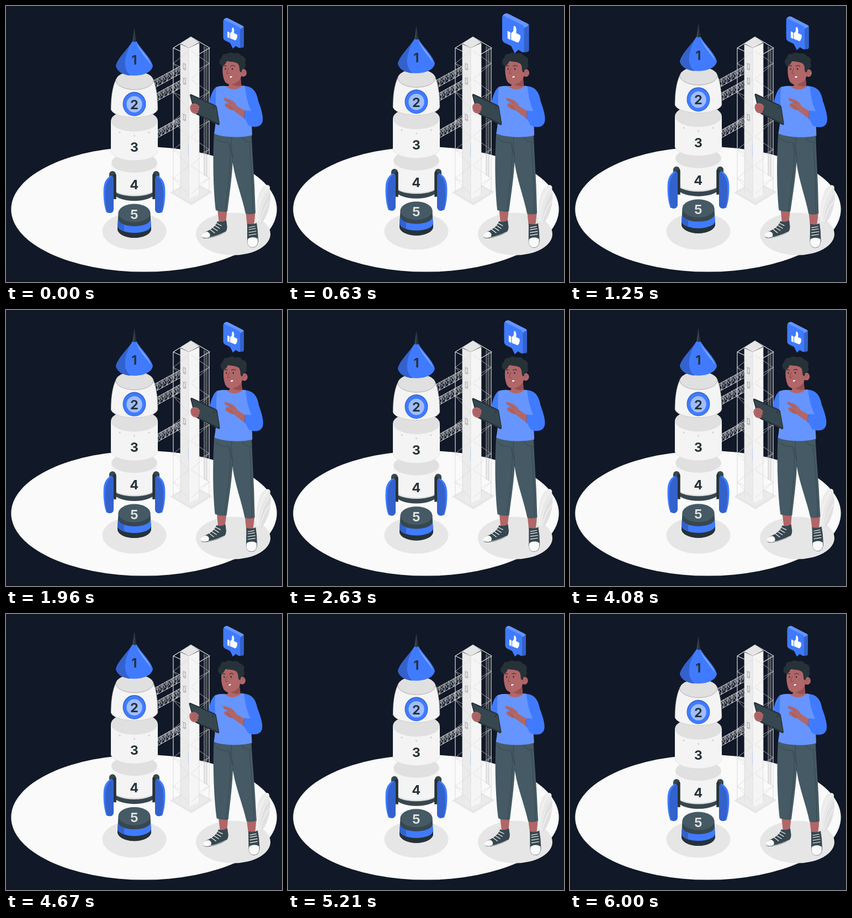
An HTML page with a canvas for the animation above (6.04 s loop, 500 by 500 pixels).

```html
<!DOCTYPE html>
<html lang="en">
<head>
<meta charset="utf-8">
<title>Rocket assembly</title>
<style>
html, body { margin: 0; width: 100%; height: 100%; overflow: hidden; background: #111827; }
canvas { display: block; width: 500px; height: 500px; }
</style>
</head>
<body>
<canvas id="stage"></canvas>
<script>
const canvas = document.getElementById('stage');
const ctx = canvas.getContext('2d');
const ratio = window.devicePixelRatio || 1;
canvas.width = canvas.height = 500 * ratio;

const LOOP = 6040, CYCLE = 6000;
const BLUE = '#407bff', SKY = '#6695ff', NAVY = '#3362cc';
const INK = '#263238', SLATE = '#37474f', STEEL = '#455a64';
const SKIN = '#b16668', SHADE = '#9a5052';
const WHITE = '#fafafa', HULL = '#f4f4f4', GREY = '#e0e0e0', PALE = '#ebebeb';

const paths = new Map();
function path(d) {
  if (!paths.has(d)) paths.set(d, new Path2D(d));
  return paths.get(d);
}
function fill(color, d) {
  ctx.fillStyle = color;
  ctx.fill(path(d));
}
function line(color, width, d) {
  ctx.strokeStyle = color;
  ctx.lineWidth = width;
  ctx.stroke(path(d));
}
function oval(color, x, y, rx, ry = rx) {
  ctx.fillStyle = color;
  ctx.beginPath();
  ctx.ellipse(x, y, rx, ry, 0, 0, Math.PI * 2);
  ctx.fill();
}
function group(draw, setup) {
  ctx.save();
  setup();
  draw();
  ctx.restore();
}
function around(x, y, change) {
  ctx.translate(x, y);
  change();
  ctx.translate(-x, -y);
}
function digit(text, y, color = INK) {
  ctx.fillStyle = color;
  ctx.fillText(text, 232.3, y);
}
// Linear interpolation through [time, value] pairs
function track(t, keys) {
  for (let i = 1; i < keys.length; i++) {
    const [a, from] = keys[i - 1], [b, to] = keys[i];
    if (t <= b) return from + (to - from) * (t - a) / (b - a);
  }
  return keys[keys.length - 1][1];
}

function ground() {
  ctx.fillStyle = '#111827';
  ctx.fillRect(0, 0, 500, 500);
  oval(WHITE, 250, 368.3, 240.7, 113.3);
  oval('#e6e6e6', 232.5, 408, 58, 33.5);
  oval('#e6e6e6', 411.5, 413, 67.5, 38.5);
}

function plant() {
  fill(PALE, 'M453 390C453 356 457 333 468 326C474 322 479 325 478 331C472 345 462 364 458 391Z');
  fill(GREY, 'M457 392C460 362 467 343 478 334C482 350 476 379 462 395Z');
  line(WHITE, 1, 'M455 390C456 361 462 340 474 327M458 391C461 367 468 347 479 335M460 393C464 376 471 361 478 353');
}

function tower() {
  fill('#e6e6e6', 'M297 338L335 316L374 337L336 361Z');
  fill(PALE, 'M303 338L335 320L368 337L336 356Z');
  fill(PALE, 'M316 69L331 76V349L316 340Z');
  fill('#f5f5f5', 'M331 76L350 67V341L331 350Z');
  fill('#e6e6e6', 'M316 68L335 56L350 66L331 76Z');
  line('#e0e0e0', 1.2, 'M303 76L335 56L369 76M303 76V337M368 76V337M303 76L316 82M369 76L350 87');
  line('#dadada', .8, 'M331 77V349M316 69V340M350 67V341');

  ctx.strokeStyle = '#d6d6d6';
  ctx.lineWidth = .7;
  ctx.beginPath();
  for (let y = 82; y < 310; y += 52) {
    ctx.moveTo(303, y + 22); ctx.lineTo(331, y);
    ctx.moveTo(303, y + 22); ctx.lineTo(331, y + 52);
    ctx.moveTo(303, y + 22); ctx.lineTo(317, y + 29);
    ctx.moveTo(368, y + 22); ctx.lineTo(336, y);
    ctx.moveTo(368, y + 22); ctx.lineTo(336, y + 50);
    ctx.moveTo(368, y + 22); ctx.lineTo(350, y + 32);
  }
  ctx.stroke();

  ctx.strokeStyle = '#b8b8b8';
  ctx.beginPath();
  ctx.moveTo(359, 73); ctx.lineTo(359, 306);
  ctx.moveTo(364, 76); ctx.lineTo(364, 309);
  for (let y = 74; y < 306; y += 3) {
    ctx.moveTo(359, y); ctx.lineTo(364, y + 3);
  }
  ctx.stroke();

  for (const y of [103, 129, 195]) {
    ctx.fillStyle = '#bdbdbd';
    ctx.beginPath();
    ctx.moveTo(320.5, y); ctx.lineTo(326, y + 2);
    ctx.lineTo(326, y + 14); ctx.lineTo(320.5, y + 12);
    ctx.fill();
    ctx.fillStyle = '#e6e6e6';
    ctx.fillRect(322, y + 3, 2.5, 7);
  }
  line('#a9c3ff', .6, 'M330.5 252V272');
}

// Lattice walkway from the tower to the rocket
function arm(x, y, top) {
  const steps = 6, dx = (317 - x) / steps, dy = (top - y) / steps;
  ctx.strokeStyle = '#dcdcdc';
  ctx.lineWidth = 1;
  ctx.beginPath();
  for (const h of [0, 14]) {
    ctx.moveTo(x, y + h);
    ctx.lineTo(317, top + h);
  }
  ctx.stroke();
  ctx.lineWidth = .75;
  ctx.beginPath();
  for (let i = 0; i < steps; i++) {
    const ax = x + i * dx, ay = y + i * dy;
    ctx.moveTo(ax, ay); ctx.lineTo(ax + dx, ay + dy + 14);
    ctx.moveTo(ax, ay + 14); ctx.lineTo(ax + dx, ay + dy);
    ctx.moveTo(ax, ay); ctx.lineTo(ax, ay + 14);
    ctx.moveTo(ax, ay + 7); ctx.lineTo(ax + dx / 2, ay + dy / 2);
    ctx.lineTo(ax + dx, ay + dy + 7);
  }
  ctx.stroke();
}

function fin() {
  fill(SLATE, 'M187 304C188 299 195 297 198 302L199.5 306V350H194L187 318Z');
  fill(INK, 'M194 307C195 303 198 303 199.5 306V350L194 347Z');
  fill(BLUE, 'M176.7 332C177 319 183 310 191 307.5L194 311V370L190 375L182 374C178 364 176 348 176.7 332Z');
  fill(NAVY, 'M180 333C181 320 186 312 193 308.5Q195 309 195 314V369Q194 376 186 375L183 373C180 363 179 346 180 333Z');
}

function rocket() {
  // Engine
  fill(SLATE, 'M203.5 375L202 404A30.5 16 0 0 0 263 404L261.5 375Z');
  fill(INK, 'M202.3 398L202 404A30.5 16 0 0 0 263 404L262.7 398A30.3 13 0 0 1 202.3 398Z');
  fill(BLUE, 'M203 387A29.6 13 0 0 0 262 387L262.8 398A30.3 13 0 0 1 202.2 398Z');
  fill(NAVY, 'M203 387Q206 393 214 397V408.2Q205 405 202.2 398Z');
  oval(STEEL, 232.5, 375, 29, 16.5);
  digit('5', 385.6, GREY);

  // Lower stage
  fill(SLATE, 'M193 330V336A39.5 17 0 0 0 272 336V330Z');
  fill(HULL, 'M191 284V328A41.5 16.5 0 0 0 274 328V284Z');
  line('#c2c2c2', .8, 'M198 336A41 16 0 0 0 267 336');
  oval(GREY, 232.5, 284, 41.5, 18);
  fin();
  group(fin, () => { ctx.translate(465, 0); ctx.scale(-1, 1); });
  digit('4', 332.2);

  // Middle stage
  fill(HULL, 'M190 208V262A42.5 18 0 0 0 275 262V208Z');
  line(GREY, .8, 'M190 262A42.5 18 0 0 0 275 262');
  oval(GREY, 232.5, 208, 42.5, 19.5);
  for (const [x, y] of [[206, 229], [232.5, 235], [259, 229]]) oval('#cfcfcf', x, y, 1.5);
  digit('3', 264.2);

  // Capsule
  fill(HULL, 'M199 133C192 148 190 168 190 186A42.5 16 0 0 0 275 186C275 168 273 148 267 133Z');
  line('#c4c4c4', .7, 'M190 186A42.5 16 0 0 0 275 186');
  line('#555', .5, 'M199 134C192 148 190 168 190 186M267 134C273 148 275 168 275 186');
  oval(GREY, 233, 135, 34, 16.5);
  line('#777', .5, 'M199 135A34 16.5 0 0 0 267 135');
  oval(NAVY, 232.5, 177.5, 21, 22);
  oval(BLUE, 232.5, 178, 20, 20.8);
  oval('#a0bdff', 232.6, 178, 14.2, 14.8);
  digit('2', 186.8);

  // Nose
  fill(SLATE, 'M232.5 40L236.3 65Q232.5 68 229 65Z');
  fill(INK, 'M232.5 40L236.3 65Q234 67 232.5 66.5Z');
  fill(BLUE, 'M229 64Q232.5 66 236.5 64C244 78 261 92 266 108C263 132 203 132 199 108C204 92 221 78 229 64Z');
  fill(NAVY, 'M228.5 65C221 78 204 92 199 108C201 119 212 125 226 126C211 115 213 91 228.5 65Z');
  fill('#7ea6ff', 'M236 67C244 80 258 92 263 107C255 95 242 82 236 67Z');
  digit('1', 106.2);
}

function shoes() {
  fill(SKIN, 'M383 367H401L398 394H386Z');
  fill(SKIN, 'M434 372H452L449 398H437Z');
  fill(SLATE, 'M383 390C388 392 395 391 399 388L400.5 399Q401 406 397 410L389 414C379 418 370 421 360 421C353 420 353 414 360 410C372 405 380 399 383 390Z');
  fill(WHITE, 'M365 409C370 411 371 416 368 419C360 422 352 419 355 414C357 411 361 409 365 409Z');
  line(WHITE, .8, 'M368 419.5C378 418 387 414 397 409.5');
  line(WHITE, 1.2, 'M370 405L378 411M375 402L383 407M379 398L387 403M382 394L390 398');
  fill(SLATE, 'M437 394Q446 397 454 393L456 407L457 425C456 434 453 437.5 446 437.5C439 437 437 431 437 424Z');
  fill(WHITE, 'M438 422C443 418 452 418 456 422C457 433 453 437 446 437C440 437 436 431 438 422Z');
  line(WHITE, 1.2, 'M440 415L453 413M440 410L453 408M440 405L452 403M440 401L451 399');
}

function legs() {
  fill(STEEL, 'M410 234H445C446 262 448.5 295 450 325L452 375Q443 379 434 376C428 347 416 317 411 286Z');
  fill(STEEL, 'M377 230L445 234C442 258 425 271 411 275C410 307 405 340 401 372Q390 374 380 370C376 337 374 281 377 230Z');
  line(SLATE, 1, 'M380 240Q390 249 403 247L411 275M409 237Q407 250 411 275M427 236Q430 247 445 247');
  line('#36484f', .9, 'M406 249C408 292 401 333 397 373M441 249C444 292 447 330 447 376');
}

function torso() {
  fill(BLUE, 'M382 146C375 150 371 160 367 179L380 187L391 164Z');
  fill(SKIN, 'M369 177L380 184L361 198L347 190Z');
  fill(SKIN, 'M408 132L425 130L427 149C420 155 408 155 402 148Z');
  fill(SKIN, 'M397 145H428Q421 154 410 153Q401 152 397 145Z');
  fill(SKY, 'M381 147Q388 144 398 145C405 153 421 153 428 144C438 145 445 151 448 164L444 190L446 234C430 239 393 239 377 231C383 203 378 169 381 147Z');
  fill(BLUE, 'M433 145C446 146 454 154 457 172C463 188 466 200 465 207C464 218 453 222 439 216L432 203L444 190C437 174 434 160 433 145Z');
}

function head() {
  fill(SKIN, 'M394 101C391 114 392 126 396 136C401 144 411 144 418 139C425 134 428 127 428 113L421 97Z');
  fill(SHADE, 'M409 142C417 140 423 135 425 131L426 144Q418 147 409 142Z');
  oval(SKIN, 430, 121, 6, 7);
  line(SHADE, .9, 'M428 123Q430 117 434 118');
  fill(INK, 'M390 108C385 104 386 96 391 94C390 89 396 85 400 87C404 83 410 84 413 86C418 84 424 86 426 90C433 91 436 98 433 103C436 109 433 114 428 115C427 122 424 121 423 116C423 108 421 104 417 103C411 100 405 102 400 99C398 105 395 109 390 108Z');
  oval(INK, 410, 114, 1.2, 1.8);
  oval(INK, 397.5, 114, 1.1, 1.8);
  line(INK, 1.2, 'M407 109Q411 106 414 109M394 109Q397 107 399 109');
  line('#7d3e42', .9, 'M403 113Q400 119 400 122Q402 124 404 122');
  fill('#fff', 'M405 127L410 126Q410 130 406 130Z');
  line('#7d3e42', .8, 'M404 128Q407 126 410 126');
}

function tablet() {
  fill(INK, 'M333 162Q333 159 336 160L378 179Q381 180 382 183L387 213Q387 217 384 215.5L346 197Q342 195 341 192Z');
  fill(SLATE, 'M335 162L377 181Q380 182 381 185L385.5 213L347 195Q343 193 342 190Z');
  oval(INK, 376, 185, 1.4);
  fill(SKIN, 'M336 178C341 175 348 178 349 181Q352 183 349 186Q351 189 348 190Q349 194 345 195C339 196 335 192 334 188Q332 181 336 178Z');
  line(SHADE, .8, 'M338 181L348 183M337 185L348 187M338 189L347 191');
}

function pointer() {
  fill(SKIN, 'M432 190L418 181C415 173 407 169 398 167C394 165 393 170 398 172L406 176C398 174 394 178 398 183L407 188L417 190L431 202C435 207 442 207 443 200Z');
  line(SHADE, .9, 'M397 171L408 176M400 179L408 183M403 184L411 187');
  fill(BLUE, 'M433 189L444 190L455 205L447 219L432 204Z');
  fill(SKIN, 'M416 181L433 190L432 204L413 190Z');
  line(NAVY, .8, 'M433 190Q430 197 432 204');
}

function man() {
  shoes();
  legs();
  torso();
  head();
  tablet();
  pointer();
}

function bubble() {
  fill(NAVY, 'M394 26L400 21.5L429 36Q431 37 431 40V72Q431 75 428 75.5L422 76L412 70Z');
  fill(SKY, 'M394 25Q396 22 399 21.5L402 22L429 36L431 38L424 42Z');
  fill(NAVY, 'M407 66L418 71L411 77Z');
  fill(BLUE, 'M393.5 27Q393.5 24 397 25.5L421 37.5Q424 39 424 42V73Q424 77 421 75L416 72L411 77L406 67L396 62Q393.5 60 393.5 57Z');
  fill('#fff', 'M401 46L405 48V58.5L401 56.5ZM406 49L409 46.5L409.5 40Q410 38 412 40Q414 43 413 49L418 51.5Q420 53 418.5 54.5Q420 56.5 418 57.5Q419 59.5 417 60Q417.5 62.5 414.5 62L406 58.5Z');
}

function render(time) {
  const t = time < CYCLE ? time : 0;
  const lift = -10 * (1 - Math.abs(1 - (t % 3000) / 1500));
  const sway = track(t, [[0, 0], [1500, 1], [4500, -1], [6000, 0]]) * Math.PI / 180;
  const beat = track(t, [[0, 1], [630, 1.3], [1560, 1], [2350, 1], [3060, 1.27], [3460, 1]]);

  ctx.setTransform(ratio, 0, 0, ratio, 0, 0);
  ctx.lineCap = ctx.lineJoin = 'round';
  ctx.font = '700 23.5px Inter, "Open Sans", sans-serif';
  ctx.textAlign = 'center';
  ground();
  group(plant, () => around(457, 391, () => ctx.rotate(sway)));
  tower();
  arm(266, 136, 108);
  arm(270, 160, 134);
  arm(274, 225, 201);
  group(rocket, () => ctx.translate(0, lift));
  group(man, () => around(399, 261, () => ctx.rotate(sway)));
  group(bubble, () => around(412, 49, () => ctx.scale(beat, beat)));
}

function frame() {
  render(performance.now() % LOOP);
  requestAnimationFrame(frame);
}
frame();
</script>
</body>
</html>
```
